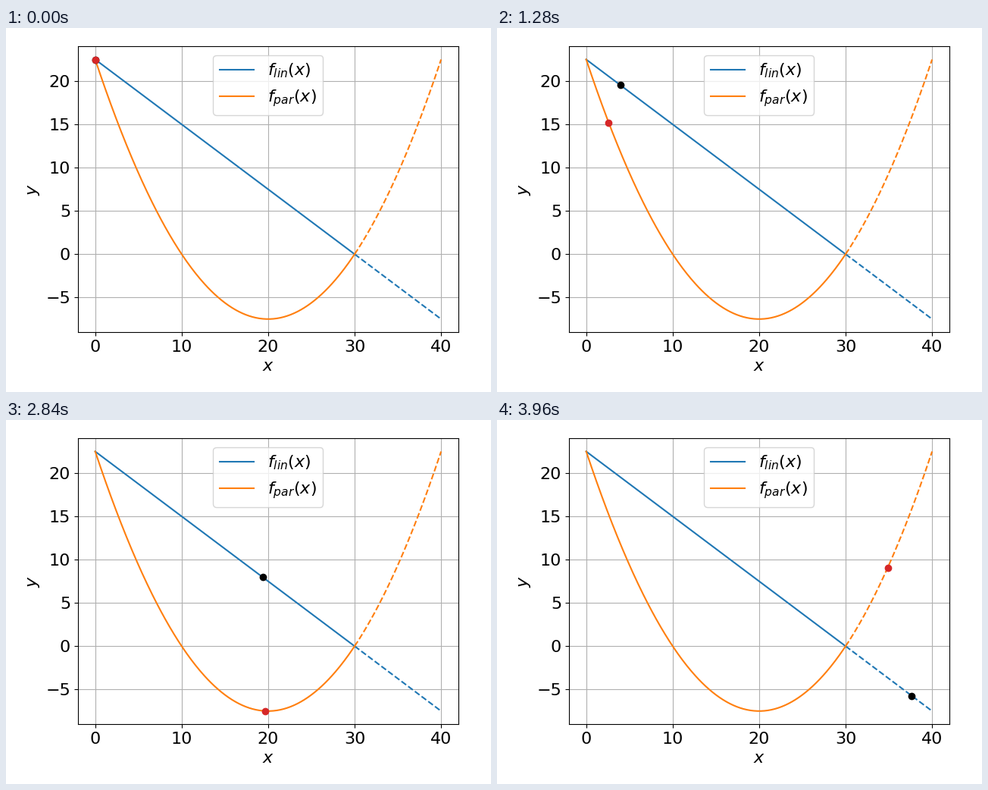
A matplotlib script for the animation above (4000 ms loop, 640 px wide and 480 px high).

```python
import numpy as np
import matplotlib.pyplot as plt
from matplotlib.animation import FuncAnimation

W, H, DPI = 640, 480, 100
STEP, FRAMES = 40, 100
G = 10.0
LEFT, TOP, UNIT = 94.9, 24.4, 11.41  # axes corner and pixels per data unit

plt.rcParams.update({"font.size": 16, "font.family": "DejaVu Sans"})


def f_lin(x):
    return 22.5 - 0.75 * x


def f_par(x):
    return 0.075 * (x - 20) ** 2 - 7.5


# Frictionless slide on the parabola, with x = 20 (1 - cos a)
angle = np.linspace(0, np.pi, 4001)
rate = 20 * np.sqrt((1 + 9 * np.cos(angle) ** 2) / (60 * G))
steps = (rate[1:] + rate[:-1]) / 2 * np.diff(angle)
elapsed = np.concatenate([[0], np.cumsum(steps)])


def slide_lin(t):
    return 0.24 * G * t ** 2


def slide_par(t):
    return 20 * (1 - np.cos(np.interp(t, elapsed, angle)))


fig = plt.figure(figsize=(W / DPI, H / DPI), dpi=DPI)
width, height = 44 * UNIT, 33 * UNIT
ax = fig.add_axes([LEFT / W, 1 - (TOP + height) / H, width / W, height / H])

solid = np.linspace(0, 30, 301)
dashed = np.linspace(30, 40, 101)
for f, color, name in ((f_lin, "C0", "lin"), (f_par, "C1", "par")):
    ax.plot(solid, f(solid), color=color, label=f"$f_{{{name}}}(x)$")
    ax.plot(dashed, f(dashed), "--", color=color)

black, = ax.plot([], [], "o", color="black")
red, = ax.plot([], [], "o", color="C3")

ax.set_xlim(-2, 42)
ax.set_ylim(-9, 24)
ax.set_xticks(range(0, 41, 10))
ax.set_yticks(range(-5, 21, 5))
ax.set_xlabel("$x$")
ax.set_ylabel("$y$")
ax.grid()
ax.legend(loc="upper center")


def update(i):
    t = i * STEP / 1000
    for dot, f, x in ((black, f_lin, slide_lin(t)), (red, f_par, slide_par(t))):
        dot.set_data([x], [f(x)])
    return black, red


anim = FuncAnimation(fig, update, frames=FRAMES, interval=STEP,
                     repeat=True, repeat_delay=0)
plt.show()
```
